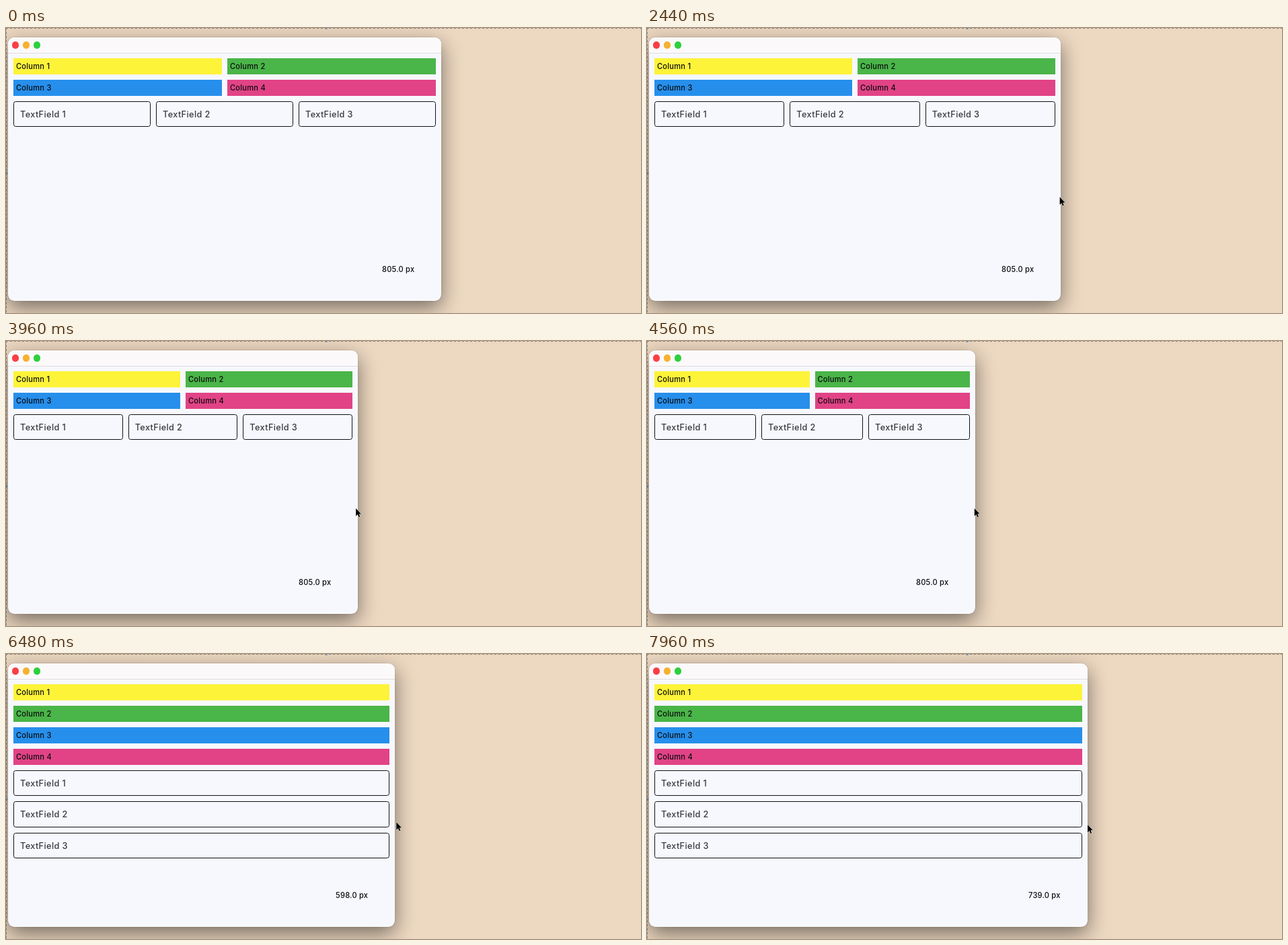
These frames come from a looping animation (944x424 px, 8000 ms). An HTML page:

```html
<!DOCTYPE html>
<html lang="en">
<head>
<meta charset="utf-8">
<title>Responsive columns</title>
<style>
  html, body { margin: 0; width: 100%; height: 100%; overflow: hidden; }
  body { position: relative; background: #edd8c1; font: 500 11.1px/24px Inter, "Open Sans", sans-serif; letter-spacing: .23px; color: #0c0c0f; }
  body > *, #win > * { position: absolute; }
  .dash { left: 0; top: 0; background: repeating-linear-gradient(var(--dir), #8d8378 0 3px, #d9c7b4 3px 6px); }
  .top { --dir: 90deg; width: 100%; height: 1px; }
  .left { --dir: 180deg; width: 1px; height: 100%; }
  .handle { width: 4px; height: 4px; border-radius: 50%; background: #7391ae; }
  #win { left: 3px; top: 14px; height: 392px; border-radius: 9px; background: #f7f8fd;
    box-shadow: 0 0 1px rgba(0,0,0,.55), 0 10px 30px rgba(0,0,0,.5); }
  .bar { left: 0; right: 0; top: 0; height: 23px; border-radius: 9px 9px 0 0; background: #fbf9fa; border-bottom: 1px solid #dddce1; }
  .light { top: 6.3px; width: 10.4px; height: 10.4px; border-radius: 50%; }
  .content { left: 8px; right: 8px; top: 31px; }
  .grid { display: grid; gap: 8px; margin-bottom: 8px; }
  .col { height: 24px; padding-left: 4px; white-space: nowrap; }
  .field { box-sizing: border-box; height: 38.4px; border: 1px solid #111114; border-radius: 3.5px; padding-left: 9px;
    font-size: 12.7px; line-height: 37px; letter-spacing: .38px; color: #38393e; white-space: nowrap; }
  #size { right: 40px; top: 333px; width: 48px; white-space: nowrap; }
  #cursor { left: 0; top: 0; overflow: visible; }
</style>
</head>
<body>
<div class="dash top"></div>
<div class="dash left"></div>
<div class="handle" style="left:474px;top:-2px"></div>
<div class="handle" style="left:-2px;top:214px"></div>
<div id="win">
  <div class="bar"></div>
  <div class="light" style="left:6px;background:#f93f46"></div>
  <div class="light" style="left:22px;background:#f6b12f"></div>
  <div class="light" style="left:38px;background:#2dd03d"></div>
  <div class="content">
    <div class="grid" id="cols"></div>
    <div class="grid" id="fields"></div>
  </div>
  <div id="size"></div>
</div>
<svg id="cursor" width="10" height="15">
  <path d="M0 0V11.4L2.6 9 4.3 13 6.2 12.2 4.5 8.3H8Z" fill="#000" stroke="#fff" paint-order="stroke"/>
</svg>
<script>
const $ = id => document.getElementById(id);
const LOOP = 8000, MAX = 647, MIN = 481;

const progress = (t, from, to) => Math.min(1, Math.max(0, (t - from) / (to - from)));
const easeIn = (p, k) => p ** k;
const easeOut = (p, k) => 1 - (1 - p) ** k;

// Right edge of the window: a slow then a quick shrink, a growth, a pause, more growth.
const edgeAt = t => MAX
  - 57 * easeIn(progress(t, 1260, 3120), 1.27)
  - 109 * easeOut(progress(t, 3120, 4800), 1.38)
  + 113 * easeOut(progress(t, 5720, 7080), 2.38)
  + 61 * progress(t, 7460, 7960);

function addCell(parent, type, text, color = '') {
  const cell = document.createElement('div');
  cell.className = type;
  cell.textContent = text;
  cell.style.background = color;
  $(parent).append(cell);
}
['#fdf339', '#4ab548', '#268fec', '#e14386'].forEach((c, i) => addCell('cols', 'col', `Column ${i + 1}`, c));
[1, 2, 3].forEach(n => addCell('fields', 'field', `TextField ${n}`));

function setColumns(id, count) {
  $(id).style.gridTemplateColumns = `repeat(${count}, 1fr)`;
}

function draw(t) {
  $('win').style.width = Math.round(edgeAt(t)) - 3 + 'px';

  // The layout and the readout update only once resizing pauses.
  const wide = t < 5100;
  setColumns('cols', wide ? 2 : 1);
  setColumns('fields', wide ? 3 : 1);
  $('size').textContent = (wide ? 805 : t < 7260 ? 598 : 739).toFixed(1) + ' px';

  // The pointer comes in from the right, then leads the edge it drags.
  const lead = edgeAt(t + 40);
  const away = 1 - easeOut(progress(t, 40, 520), 2);
  const x = lead + 187 * away;
  const y = 249 + 5 * ((lead - MIN) / 174) ** 2.5 + 78 * away;
  $('cursor').style.transform = `translate(${x}px, ${y}px)`;
  $('cursor').style.visibility = t < 40 ? 'hidden' : 'visible';
}

let start;
function tick(now) {
  start ??= now;
  draw((now - start) % LOOP);
  requestAnimationFrame(tick);
}
draw(0);
requestAnimationFrame(tick);
</script>
</body>
</html>
```
